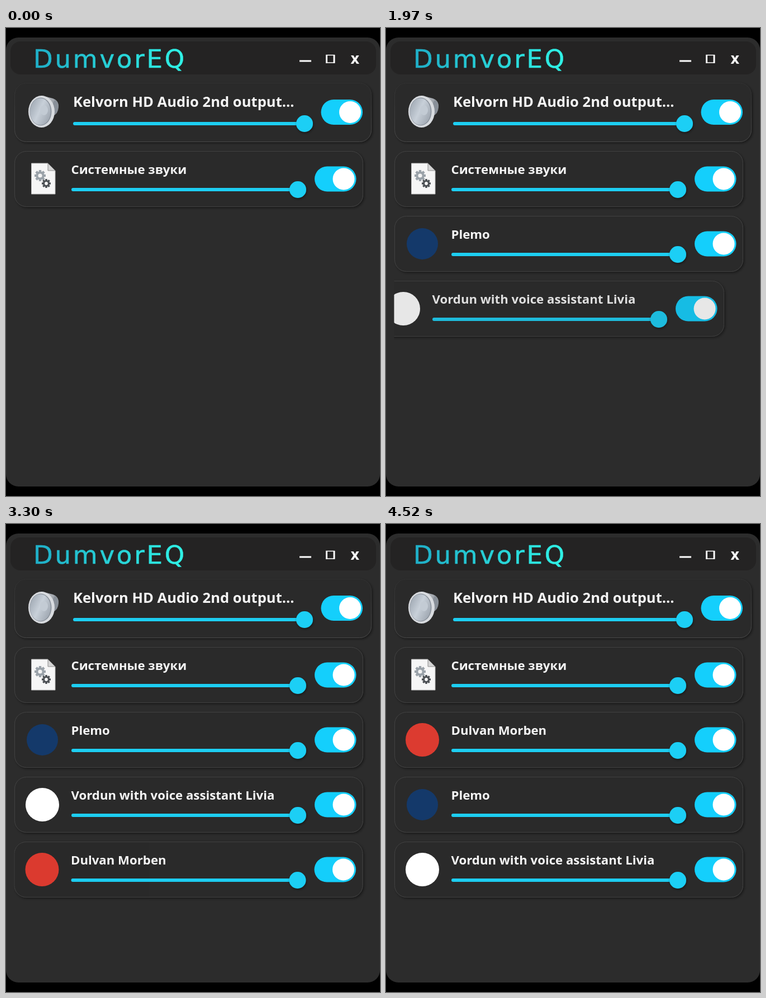
Write an HTML page that moves like this. It is 669 px wide and 837 px high and loops after 4550 ms.

```html
<!DOCTYPE html>
<html lang="en">
<head>
<meta charset="utf-8">
<title>Volume mixer</title>
<style>
  html, body { margin: 0; width: 100%; height: 100%; overflow: hidden; background: #000; }
  svg { display: block; width: 669px; height: 837px; }
  text { font-family: "Open Sans", "Noto Sans", sans-serif; font-weight: 700; fill: #f6f6f6; }
  .title { font-family: "DejaVu Sans", sans-serif; font-weight: 400; font-size: 45px; letter-spacing: 3.8px; fill: url(#cyan); stroke: url(#cyan); stroke-width: .6; }
  .card { fill: #2b2b2b; stroke: #434343; filter: url(#shade); }
</style>
</head>
<body>
<svg viewBox="0 0 669 837">
  <defs>
    <linearGradient id="cyan" gradientUnits="userSpaceOnUse" x1="53" y1="0" x2="319" y2="0">
      <stop offset="0" stop-color="#1fafc8"/>
      <stop offset="1" stop-color="#2ff2e6"/>
    </linearGradient>
    <linearGradient id="edge" x1="0" y1="0" x2="0" y2="1">
      <stop offset="0" stop-color="#303030"/>
      <stop offset="1" stop-color="#484848"/>
    </linearGradient>
    <linearGradient id="metal" x1="0" y1="0" x2="1" y2="1">
      <stop offset="0" stop-color="#c9cdd2"/>
      <stop offset="1" stop-color="#6c727a"/>
    </linearGradient>
    <linearGradient id="cone" x1="0" y1="0" x2="1" y2=".6">
      <stop offset="0" stop-color="#98a1ac"/>
      <stop offset=".55" stop-color="#c8d0d9"/>
      <stop offset="1" stop-color="#a3abb5"/>
    </linearGradient>
    <filter id="shade" x="-5%" y="-10%" width="110%" height="130%">
      <feDropShadow dx="2" dy="2" stdDeviation="2" flood-color="#000" flood-opacity=".45"/>
    </filter>
    <filter id="knob" x="-30%" y="-30%" width="170%" height="170%">
      <feDropShadow dx="1" dy="2" stdDeviation="2" flood-color="#000" flood-opacity=".45"/>
    </filter>
    <clipPath id="list"><rect x="14.5" y="90" width="640" height="730"/></clipPath>
  </defs>

  <rect width="669" height="837"/>
  <rect y="17" width="669" height="803" rx="22" fill="#2c2c2c"/>
  <rect x="8" y="24" width="654" height="59" rx="18" fill="#242323"/>
  <text class="title" x="49" y="71">DumvorEQ</text>
  <rect x="525" y="57.5" width="21" height="3" fill="#fff"/>
  <path d="M572 48.5H588M572 62H588" stroke="#fff" stroke-width="1.5"/>
  <path d="M573.5 48V62.7M587 48V62.7" stroke="#fff" stroke-width="3"/>
  <text x="616.5" y="63.5" font-size="21.5" style="font-weight:800">X</text>

  <g id="device"></g>
  <g id="apps" clip-path="url(#list)"></g>
</svg>
<script>
const LOOP = 4550, TOP = 220, PITCH = 116;
const SLIDE = 680, SHIFT = 300;
const DROP_AT = 3384, DROP = 466, SORT_AT = 3860;

const $ = id => document.getElementById(id);
const easeOut = u => 1 - (1 - Math.max(0, Math.min(1, u))) ** 3;

const slider = (x1, x2, y) => `
  <path d="M${x1 + 3} ${y}H${x2}" stroke="#1dcef2" stroke-width="6" stroke-linecap="round"/>
  <circle cx="${x2}" cy="${y}" r="15" fill="#1acff5" filter="url(#knob)"/>`;

const toggle = (x, y) => `
  <rect x="${x}" y="${y}" width="74.5" height="45" rx="22.5" fill="#14cffc"/>
  <circle cx="${x + 52}" cy="${y + 22.5}" r="19.5" fill="#fff"/>`;

const disc = (r, fill) => `<circle cx="65" cy="50" r="${r}" fill="${fill}"/>`;

function gear(x, y, r, fill) {
  let teeth = "";
  for (let i = 0; i < 4; i++)
    teeth += `<rect x="${-r}" y="${-r * .22}" width="${2 * r}" height="${r * .44}" transform="rotate(${i * 45})"/>`;
  return `<g transform="translate(${x} ${y})" fill="${fill}">${teeth}
    <circle r="${r * .76}"/><circle r="${r * .36}" fill="#f4f4f4"/></g>`;
}

const page = `
  <path d="M45.5 22H75L88 35V77H45.5Z" fill="#f6f6f6" stroke="#b8b8b8"/>
  <path d="M75 22V35H88Z" fill="#d4d4d4" stroke="#8e8e8e"/>
  ${gear(61, 44, 10, "#9aa2a9")}${gear(72, 58, 8, "#4c5054")}`;

const speaker = `
  <path d="M64 121L84 126Q95 130 94 142Q93 154 84 157L66 178Z" fill="url(#metal)"/>
  <ellipse cx="88" cy="141" rx="4.5" ry="12" fill="#888f98"/>
  <ellipse cx="63.5" cy="149.5" rx="23.5" ry="28.5" fill="#d8dbdf"/>
  <ellipse cx="62" cy="149.5" rx="19.5" ry="25" fill="#868e98"/>
  <ellipse cx="61.5" cy="149.5" rx="18.5" ry="24" fill="url(#cone)"/>
  <ellipse cx="68" cy="147" rx="7" ry="9" fill="#c3cbd4"/>`;

$("device").innerHTML = `
  <rect class="card" x="15.5" y="98.5" width="638" height="105" rx="21" style="stroke:url(#edge)"/>
  ${speaker}
  <text x="120" y="141" font-size="25.6">Kelvorn HD Audio 2nd output...</text>
  ${slider(120, 534, 171)}${toggle(563.5, 128)}`;

// slot: place on arrival, sorted: place after the re-sort, start: arrival time
const apps = [
  { name: "Системные звуки", icon: page, slot: 0, sorted: 0, start: -SLIDE },
  { name: "Plemo", icon: disc(28, "#14396a"), slot: 1, sorted: 2, start: 525, drops: true },
  { name: "Vordun with voice assistant Livia", icon: disc(30, "#fff"), slot: 2, sorted: 3, start: 1620, drops: true },
  { name: "Dulvan Morben", icon: disc(30, "#dc3b30"), slot: 3, sorted: 1, start: 2703 }
];

$("apps").innerHTML = apps.map(a => `<g>
  <rect class="card" x="15.5" y=".5" width="623" height="99" rx="21"/>
  ${a.icon}
  <text x="116.5" y="41" font-size="22.2">${a.name}</text>
  ${slider(117, 522, 69)}${toggle(552, 27.5)}</g>`).join("");
const cards = [...$("apps").children];

function draw(t) {
  apps.forEach((a, i) => {
    const p = easeOut((t - a.start) / SLIDE);
    let y = TOP + PITCH * (t < SORT_AT ? a.slot : a.sorted);
    if (a.drops && t >= DROP_AT && t < SORT_AT)
      y -= PITCH * (1 - easeOut((t - DROP_AT) / DROP));
    cards[i].setAttribute("transform", `translate(${(-SHIFT * (1 - p)).toFixed(2)} ${y.toFixed(2)})`);
    cards[i].setAttribute("opacity", p.toFixed(3));
  });
}

function tick() {
  draw(performance.now() % LOOP);
  requestAnimationFrame(tick);
}
tick();
</script>
</body>
</html>
```
